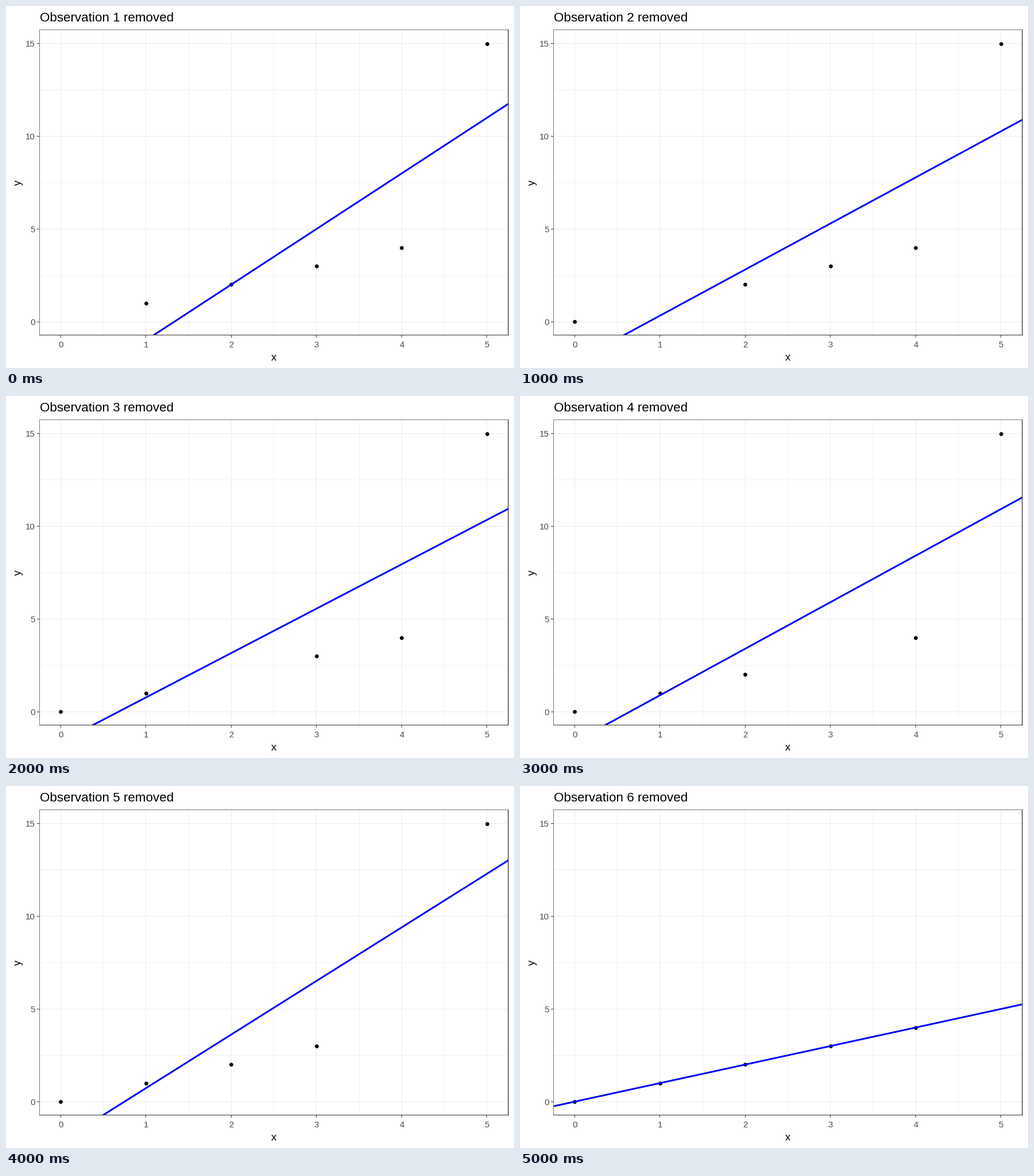
Write a matplotlib script that moves like this. It is 885 px wide and 632 px high and loops after 6 s.

```python
import numpy as np
import matplotlib.pyplot as plt
from matplotlib.animation import FuncAnimation
from matplotlib.lines import Line2D
from matplotlib.patches import Rectangle

W, H, DPI = 885, 632, 64
PX = 72 / DPI  # points per pixel
LEFT, RIGHT, TOP, BOTTOM = 58.3, 875.0, 41.5, 575.3
INK, SOFT, TEXT = "#333333", "#777777", "#4d4d4d"
GRID, FINE = "#ebebeb", "#f1f1f1"

plt.rcParams["font.family"] = "Liberation Sans"
plt.rcParams["path.snap"] = False

X = np.arange(6)
Y = np.array([0, 1, 2, 3, 4, 15])


def sx(x):
    return LEFT + (x + 0.25) / 5.5 * (RIGHT - LEFT)


def sy(y):
    return BOTTOM - (y + 0.75) / 16.5 * (BOTTOM - TOP)


def mid(v):
    """Centre of the pixel that holds v."""
    return np.floor(v) + 0.5


fig = plt.figure(figsize=(W / DPI, H / DPI), dpi=DPI, facecolor="white")
ax = fig.add_axes([0, 0, 1, 1])
ax.set_xlim(0, W)
ax.set_ylim(H, 0)
ax.axis("off")


def stroke(x, y, color, width=1, **kw):
    line = Line2D(x, y, color=color, lw=width * PX,
                  solid_capstyle="butt", **kw)
    return ax.add_line(line)


def vline(x, y0, y1, color, width=1, z=1):
    stroke([x, x], [y0, y1], color, width, zorder=z)


def hline(y, x0, x1, color, width=1, z=1):
    stroke([x0, x1], [y, y], color, width, zorder=z)


def label(x, y, text, size, color="black", **kw):
    return ax.text(x, y, text, fontsize=size * PX, color=color, **kw)


# Grid, ticks and tick labels
for x in np.arange(0.5, 5):
    vline(mid(sx(x)), 42, 574, FINE)
for y in np.arange(2.5, 15, 5):
    hline(mid(sy(y)), 59, 875, FINE)

for x in range(6):
    vline(mid(sx(x)), 42, 574, GRID, z=2)
    vline(mid(sx(x)), 575, 579, INK)
    label(sx(x), 596, str(x), 15, TEXT, ha="center")
for y in range(0, 16, 5):
    hline(mid(sy(y)), 59, 875, GRID, z=2)
    hline(mid(sy(y)), 54, 58, INK)
    label(50.5, sy(y) + 5.5, str(y), 15, TEXT, ha="right")

# Panel border: the upper and left edges are softer
vline(58.5, 41, 575, SOFT, z=5)
hline(41.5, 58, 875, SOFT, z=5)
vline(875, 41, 575, INK, 1.33, z=6)
hline(574.5, 58, 875.5, INK, z=6)

label(466.5, 619, "x", 18.33, ha="center")
label(29.5, 308.5, "y", 18.33, rotation=90, ha="right", va="center")
title = label(59, 27, "", 22.4)

dots = stroke([], [], "black", ls="none", marker="o", ms=6.8 * PX, mew=0,
              zorder=3)
fit = stroke([], [], "blue", 3, zorder=4)
fit.set_clip_path(Rectangle((59, 42), 816, 532, transform=ax.transData))


def draw(i):
    keep = X != i
    slope, start = np.polyfit(X[keep], Y[keep], 1)
    ends = np.array([-0.5, 5.5])
    title.set_text(f"Observation {i + 1} removed")
    dots.set_data(sx(X[keep]), sy(Y[keep]))
    fit.set_data(sx(ends), sy(start + slope * ends))
    return title, dots, fit


anim = FuncAnimation(fig, draw, frames=6, interval=1000, repeat=True)
plt.show()
```
